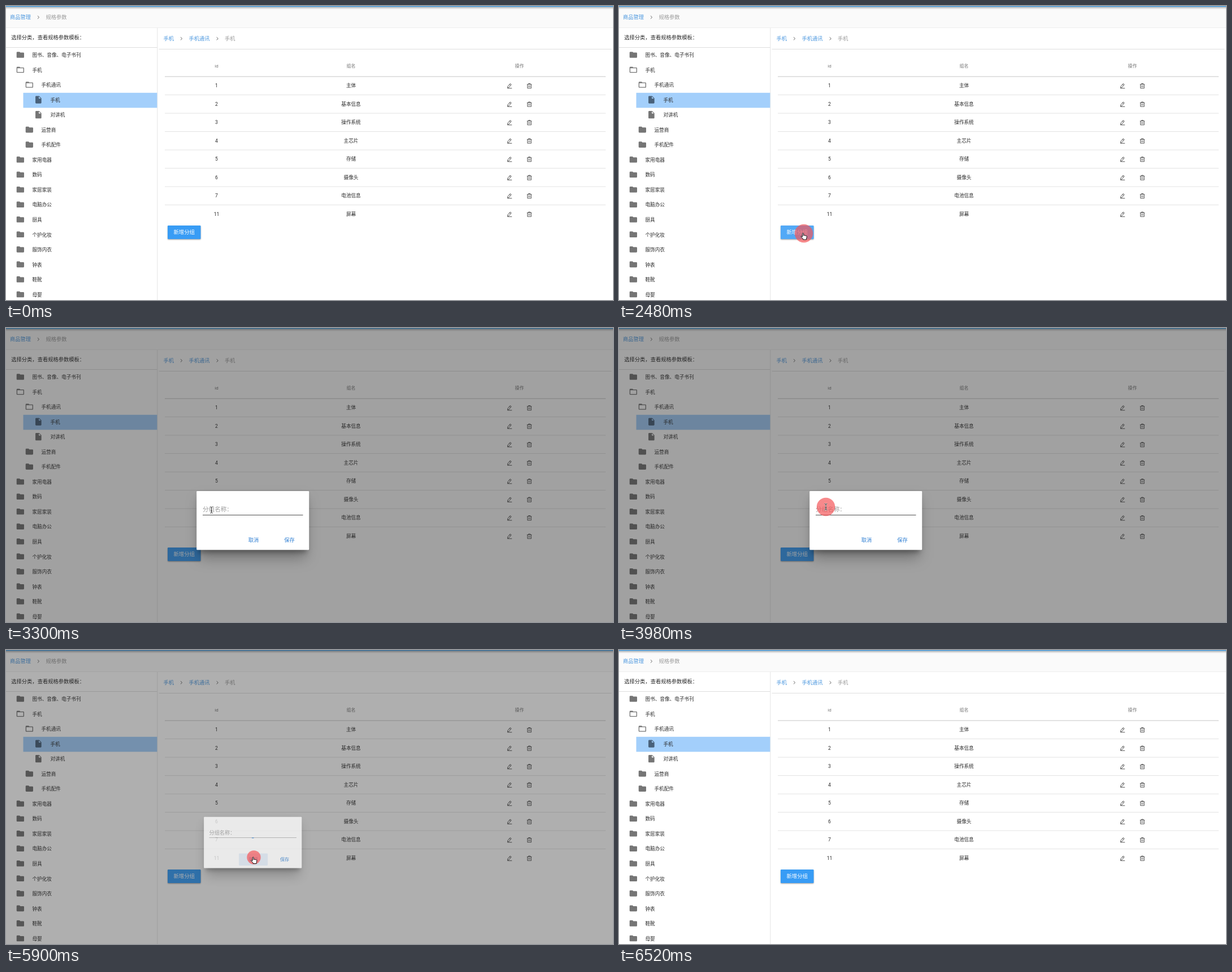
Write an HTML page that moves like this. It is 1074 px wide and 521 px high and loops after 8480 ms.

```html
<!DOCTYPE html>
<html lang="zh-CN">
<head>
<meta charset="utf-8">
<style>
html, body { margin: 0; width: 100%; height: 100%; overflow: hidden; background: #fff; }
svg { display: block; width: 1074px; height: 521px; }
text { font-family: Roboto, "Noto Sans CJK SC", "Noto Sans CJK", sans-serif; white-space: pre; }
</style>
</head>
<body>
<svg id="stage" viewBox="0 0 1074 521" xmlns="http://www.w3.org/2000/svg">
  <defs>
    <filter id="soft" x="-50%" y="-80%" width="200%" height="300%"><feGaussianBlur stdDeviation="12"/></filter>
    <filter id="tight" x="-20%" y="-40%" width="140%" height="180%"><feGaussianBlur stdDeviation="4"/></filter>
    <filter id="lift" x="-20%" y="-30%" width="140%" height="180%"><feGaussianBlur stdDeviation="1.2"/></filter>
    <linearGradient id="barShade" x2="0" y2="1">
      <stop stop-color="#000" stop-opacity=".3"/><stop offset="1" stop-color="#000" stop-opacity="0"/>
    </linearGradient>
    <path id="folder" d="M10 4H4c-1.1 0-1.99.9-1.99 2L2 18c0 1.1.9 2 2 2h16c1.1 0 2-.9 2-2V8c0-1.1-.9-2-2-2h-8l-2-2z"/>
    <path id="open" d="M20 6h-8l-2-2H4c-1.1 0-1.99.9-1.99 2L2 18c0 1.1.9 2 2 2h16c1.1 0 2-.9 2-2V8c0-1.1-.9-2-2-2zm0 12H4V8h16v10z"/>
    <path id="file" d="M6 2c-1.1 0-1.99.9-1.99 2L4 20c0 1.1.89 2 1.99 2H18c1.1 0 2-.9 2-2V8l-6-6H6zm7 7V3.5L18.5 9H13z"/>
    <path id="chevron" d="M-1.4-2.6 1.3 0-1.4 2.6" fill="none" stroke="#666" stroke-width="1"/>
    <g id="edit" fill="none" stroke="#444" stroke-width=".9">
      <path d="M-3.6 3.6-3.2.9 1-4.1 3.1-2.4-1.1 2.6ZM-.4-2.5 1.7-.8M-3.8 4.2H4.2"/>
    </g>
    <g id="trash" fill="none" stroke="#444" stroke-width=".9">
      <path d="M-4.2-2.7H4.2M-1.6-2.8V-4.1H1.6V-2.8M-3.3-2.6V4.1H3.3V-2.6M-1.1-.8V2.3M1.1-.8V2.3"/>
    </g>
  </defs>
  <g id="page"></g>
  <rect id="scrim" width="1074" height="521" fill="#212121" opacity="0"/>
  <g id="dialog">
    <rect x="342" y="304" width="189" height="104" fill-opacity=".28" filter="url(#soft)"/>
    <rect x="341" y="296" width="191" height="102" fill-opacity=".3" filter="url(#tight)"/>
    <rect x="337.2" y="289" width="199" height="104.3" rx="1.3" fill="#fff"/>
    <rect id="cancelTint" x="408.5" y="363.5" width="58.5" height="24.5" rx="1.3" fill="#1976d2" opacity="0"/>
    <rect id="underline" x="348" y="331" width="177.5" height=".8"/>
    <rect id="focusLine" y="331" height="1.4" fill="#3284d6"/>
    <rect id="caret" x="347.8" y="314.5" width=".9" height="14" fill="#1976d2"/>
  </g>
  <circle id="press" fill="#f4575a"/>
  <g id="cursor" stroke-linejoin="round">
    <path id="arrow" d="M0 0V9.4L2.1 7.4 3.7 11 5.4 10.2 3.9 6.8H6.8Z" fill="#000" stroke="#fff" stroke-width=".7"/>
    <path id="hand" d="M-2.3 6V.7Q-2.2-.5-1.3-.5T-.3.7V3.9L.5 3.3 1.8 3.8 2.6 3.7 3.7 4.3 4.5 4.3Q5.5 4.6 5.4 6L4.6 9V11H-1.3V9.7L-4.7 6.2Q-5.2 5-4 4.9Z" fill="#fff" stroke="#000" stroke-width=".9"/>
    <g id="beam" fill="none">
      <path d="M-2.4-5.6Q0-5.6 0-4 0-5.6 2.4-5.6M0-4.2V4.2M-2.4 5.6Q0 5.6 0 4 0 5.6 2.4 5.6M-1.3 1.6H1.3" stroke="#fff" stroke-width="1.8"/>
      <path d="M-2.4-5.6Q0-5.6 0-4 0-5.6 2.4-5.6M0-4.2V4.2M-2.4 5.6Q0 5.6 0 4 0 5.6 2.4 5.6M-1.3 1.6H1.3" stroke="#222" stroke-width=".9"/>
    </g>
  </g>
</svg>
<script>
const LOOP = 8480;
const LINK = '#4b97df', INK = '#2b2b2b', MUTED = '#9b9b9b';
const $ = id => document.getElementById(id);
const page = $('page'), dialog = $('dialog');

function add(parent, tag, attrs, content) {
  const node = document.createElementNS('http://www.w3.org/2000/svg', tag);
  for (const key in attrs) node.setAttribute(key, attrs[key]);
  if (content) node.textContent = content;
  return parent.appendChild(node);
}
const set = (id, attrs) => { for (const key in attrs) $(id).setAttribute(key, attrs[key]); };
const rect = (x, y, width, height, fill, more) => add(page, 'rect', { x, y, width, height, fill, ...more });
const use = (id, x, y, scale = 1, fill = '#757575') =>
  add(page, 'use', { href: '#' + id, transform: `translate(${x} ${y}) scale(${scale})`, fill });
// y is the vertical middle of the text
const label = (parent, str, x, y, size, fill, anchor = 'start', weight = 400) =>
  add(parent, 'text', { x, y: y + size * .37, 'font-size': size, fill, 'text-anchor': anchor, 'font-weight': weight }, str);

function buildPage() {
  rect(0, 0, 1074, 521, '#fff');
  rect(0, 0, 1074, 38.5, '#fafafa');
  rect(0, 38, 1074, .8, '#ececec');
  rect(0, 1, 1074, 5, 'url(#barShade)');
  rect(0, 0, 1074, 1.5, '#4a9fe0');
  rect(267.2, 38.5, 1.2, 483, '#e9e9e9');
  rect(0, 73, 267.5, 1, '#dedede');
  rect(270.5, 76, 801, 1, '#dedede');

  label(page, '商品管理', 7, 19.5, 9.28, LINK);
  use('chevron', 57.3, 20);
  label(page, '规格参数', 70.5, 19.5, 9.28, MUTED);
  label(page, '选择分类，查看规格参数模板：', 9.3, 56, 9.28, INK);
  label(page, '手机', 278.5, 57.3, 9.28, LINK);
  use('chevron', 310.3, 57.8);
  label(page, '手机通讯', 323.5, 57.3, 9.28, LINK);
  use('chevron', 374, 57.8);
  label(page, '手机', 387, 57.3, 9.28, MUTED);

  const tree = [
    ['图书、音像、电子书刊', 0, 'folder'], ['手机', 0, 'open'], ['手机通讯', 1, 'open'],
    ['手机', 2, 'file'], ['对讲机', 2, 'file'], ['运营商', 1, 'folder'], ['手机配件', 1, 'folder'],
    ...['家用电器', '数码', '家居家装', '电脑办公', '厨具', '个护化妆', '服饰内衣', '钟表', '鞋靴', '母婴']
      .map(name => [name, 0, 'folder'])
  ];
  rect(30.5, 153.8, 236.9, 26.6, '#a3cffb');
  tree.forEach(([name, depth, icon], i) => {
    const y = 87 + 26.53 * i, x = 16 * depth;
    use(icon, 17.4 + x, y - 8.5, .663, i === 3 ? '#49617a' : '#757575');
    label(page, name, 46.5 + x, y, 8.62, INK);
  });

  [['id', 372.5], ['组名', 610.5], ['操作', 908.5]].forEach(([name, x]) =>
    label(page, name, x, 106, 7.96, '#757575', 'middle'));
  rect(281, 124.6, 780, 1, '#c6c6c6');
  ['主体', '基本信息', '操作系统', '主芯片', '存储', '摄像头', '电池信息', '屏幕'].forEach((name, i) => {
    const y = 141.3 + 32.5 * i;
    label(page, i === 7 ? '11' : String(i + 1), 372.5, y, 8.62, INK, 'middle');
    label(page, name, 610.5, y, 8.62, INK, 'middle');
    use('edit', 891, y + .3);
    use('trash', 926, y + .3);
    if (i < 7) rect(281, y + 15.8, 780, .9, '#e0e0e0');
  });

  rect(286.3, 390.5, 58, 23.5, '#000', { opacity: .4, filter: 'url(#lift)' });
  rect(286, 389, 58.5, 24, '#389cf5', { rx: 1.3 });
  rect(286, 389, 58.5, 24, '#fff', { rx: 1.3, opacity: 0, id: 'addTint' });
  label(page, '新增分组', 315.2, 401, 9.4, '#fff', 'middle', 500);
}

buildPage();
const fieldLabel = label(dialog, '分组名称：', 0, 0, 10.6, MUTED);
label(dialog, '取消', 438, 375.8, 9.28, '#2f7fd3', 'middle', 500);
label(dialog, '保存', 501.5, 375.8, 9.28, '#2f7fd3', 'middle', 500);

const clamp = v => Math.min(1, Math.max(0, v));
const smooth = v => v * v * (3 - 2 * v);
const mix = (a, b, k) => a + (b - a) * k;

function bezier(x1, y1, x2, y2) {
  const at = (a, b, s) => 3 * a * s * (1 - s) ** 2 + 3 * b * s * s * (1 - s) + s ** 3;
  return x => {
    if (x <= 0 || x >= 1) return clamp(x);
    let lo = 0, hi = 1;
    for (let i = 0; i < 24; i++) {
      const mid = (lo + hi) / 2;
      if (at(x1, x2, mid) < x) lo = mid; else hi = mid;
    }
    return at(y1, y2, lo);
  };
}
const swift = bezier(.25, .8, .25, 1), fade = bezier(.25, .8, .5, 1);
const ramp = (t, start, length, ease) => ease(clamp((t - start) / length));

const path = [
  [880, 386, 521], [1450, 306.5, 385.5], [1740, 306.5, 385.5], [2240, 327, 403], [2760, 327, 403],
  [3400, 366, 317], [4420, 366, 317], [5120, 429, 361.5], [5180, 432, 367.5], [5500, 438.5, 367.5],
  [6040, 438.5, 367.5], [6500, 574, 521]
];
function pointer(t) {
  const i = path.findIndex(p => p[0] > t);
  if (i < 1) return null;
  const [t0, x0, y0] = path[i - 1], [t1, x1, y1] = path[i];
  const k = smooth((t - t0) / (t1 - t0));
  return { x: mix(x0, x1, k), y: mix(y0, y1, k) };
}
const within = (p, x, y, w, h) => p && p.x >= x && p.x <= x + w && p.y >= y && p.y <= y + h;

const presses = [[1480, 1560], [2400, 2485], [3930, 4060], [5790, 5877]];
function pressRadius(t) {
  const hit = presses.find(([down, up]) => t >= down && t < up + 260);
  if (!hit) return 0;
  return t < hit[1] ? 16.2 * clamp((t - hit[0]) / 45) : 16.2 * Math.exp((hit[1] - t) / 85);
}

function draw(t) {
  const p = pointer(t);
  const shown = t < 5877 ? ramp(t, 2490, 300, swift) : 1 - ramp(t, 5877, 300, swift);
  const shade = t < 5877 ? ramp(t, 2540, 500, fade) : t < 6000 ? 1 - ramp(t, 5877, 500, fade) : 0;
  set('scrim', { opacity: .42 * shade });

  const scale = .5 + shown / 2;
  set('dialog', {
    opacity: shown, visibility: shown > 0 ? 'visible' : 'hidden',
    transform: `translate(436.7 341.2) scale(${scale}) translate(-436.7 -341.2)`
  });

  const open = t > 2490 && t < 5877;
  const overField = open && within(p, 348, 300, 178, 32);
  const overCancel = t > 2490 && t < 6100 && within(p, 408.5, 363.5, 58.5, 24.5);
  const overAdd = within(p, 286, 389, 58.5, 24);
  set('addTint', { opacity: overAdd ? .13 : 0 });
  set('cancelTint', { opacity: overCancel ? (t < 5800 ? .05 : .12) : 0 });

  const focus = t < 5790 ? ramp(t, 3990, 300, swift) : 1 - ramp(t, 5790, 170, swift);
  const focused = t >= 3990 && t < 5790;
  const size = mix(10.6, 7.96, focus);
  fieldLabel.setAttribute('y', mix(321, 307, focus) + size * .37);
  fieldLabel.setAttribute('x', 348);
  fieldLabel.setAttribute('font-size', size);
  fieldLabel.setAttribute('fill', focus > .3 ? '#5b9adb' : MUTED);
  set('underline', { fill: overField ? '#222' : '#949494' });
  set('focusLine', { x: 436.75 - 88.75 * focus, width: 177.5 * focus });
  set('caret', { opacity: focused && (t - 3990) % 1060 < 530 ? 1 : 0 });

  const radius = p ? pressRadius(t) : 0;
  set('press', { cx: p ? p.x : 0, cy: p ? p.y : 0, r: radius, opacity: mix(.92, .7, clamp((radius - 3) / 7)) });
  const shape = overField ? 'beam' : overAdd && t < 2800 || overCancel ? 'hand' : 'arrow';
  set('cursor', { visibility: p ? 'visible' : 'hidden', transform: p ? `translate(${p.x} ${p.y})` : '' });
  for (const id of ['arrow', 'hand', 'beam']) set(id, { display: id === shape ? 'inline' : 'none' });
}

const start = performance.now();
function tick() {
  draw((performance.now() - start) % LOOP);
  requestAnimationFrame(tick);
}
tick();
</script>
</body>
</html>
```
